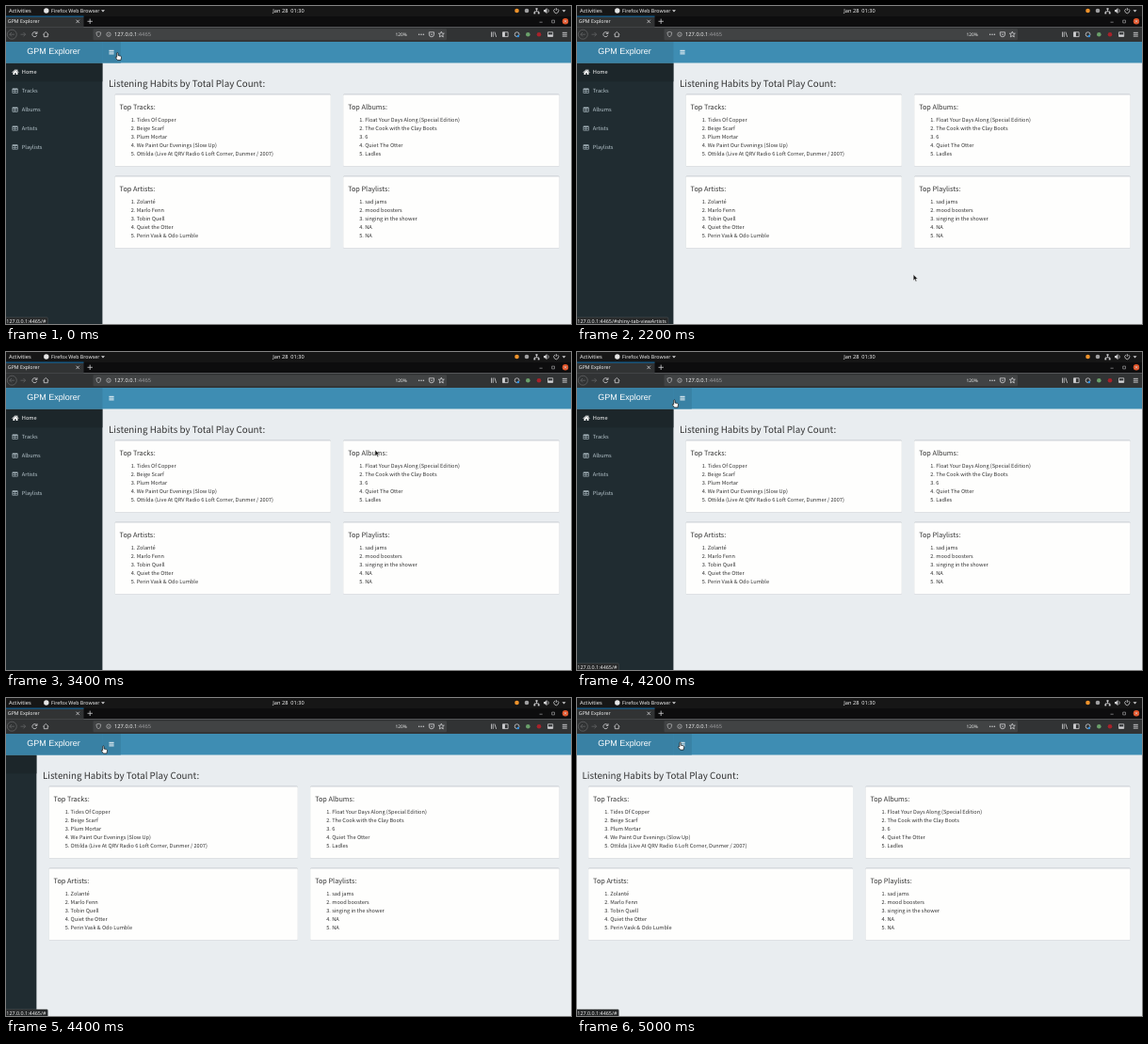
Recreate the animation shown at these times as an HTML page. Size 600 px wide and 338 px high, loop 5.3 s.

```html
<!DOCTYPE html>
<html lang="en">
<head>
<meta charset="utf-8">
<title>GPM Explorer</title>
<style>
  html, body { margin: 0; width: 100%; height: 100%; overflow: hidden; background: #e9edf0; }
  svg { display: block; width: 100%; height: 100%; }
  text { text-rendering: geometricPrecision; white-space: pre; }
  .ui { font-family: "Noto Sans", "Open Sans", sans-serif; fill: #f2f2f2; }
  .page { font-family: "Noto Sans CJK JP", "Noto Sans CJK SC", "Noto Sans CJK", "Noto Sans", sans-serif; fill: #333; }
  .logo { font-family: "Liberation Sans", Arial, sans-serif; fill: #fff; }
  .line { fill: none; stroke: #d0d0d2; stroke-width: .8; }
  .dim { opacity: .3; }
</style>
</head>
<body>
<svg id="stage" viewBox="0 0 600 338" preserveAspectRatio="none"></svg>
<script>
const LOOP = 5300, SIDEBAR = 103.5, EDGE = 102.4;
const stage = document.getElementById('stage');

const rect = (x, y, w, h, fill, more = '') =>
  `<rect x="${x}" y="${y}" width="${w}" height="${h}" fill="${fill}" ${more}/>`;
const dot = (x, y, r, fill) => `<circle cx="${x}" cy="${y}" r="${r}" fill="${fill}"/>`;
const line = (d, more = '') => `<path class="line" d="${d}" ${more}/>`;
const shape = (d, fill = '#d0d0d2') => `<path d="${d}" fill="${fill}"/>`;
const text = (cls, x, y, size, str, more = '') =>
  `<text class="${cls}" x="${x}" y="${y}" font-size="${size}" ${more}>${str}</text>`;
const bars = (x, y, w, gap, color) =>
  [-1, 0, 1].map(i => rect(x, y + i * gap - .45, w, .9, color)).join('');

// Desktop bar and browser window
function desktopBar() {
  return rect(0, 0, 600, 11, '#161616') +
    text('ui', 3, 7, 5.7, 'Activities') +
    dot(42.8, 5, 2.7, '#e6e6e6') +
    text('ui', 48, 7, 5.32, 'Firefox Web Browser') +
    shape('M101 4.2h4l-2 2.4z') +
    text('ui', 300, 7, 5.64, 'Jan 28  01:30', 'text-anchor="middle"') +
    dot(542.5, 5, 2.3, '#f0932b') +
    dot(553, 5, 2.3, '#a0a0a2') +
    line('M563.5 4v1.8M561.3 7V5.8h4.4V7') +
    rect(562.5, 2.2, 2, 1.8, '#d0d0d2') + rect(560.4, 6.6, 1.8, 1.8, '#d0d0d2') + rect(564.8, 6.6, 1.8, 1.8, '#d0d0d2') +
    shape('M571 4h1.4l2-2v6.2l-2-2H571z') + line('M575.6 3.4q1.4 1.7 0 3.4') +
    line('M583 3a2.5 2.5 0 1 0 2.6 0M584.3 2v3') +
    shape('M590.5 4.2h4l-2 2.4z');
}

function tabStrip() {
  return rect(0, 11, 600, 11.5, '#0d0d0e') +
    rect(0, 11, 82.5, 11.5, '#313334') + rect(0, 10.6, 82.5, .9, '#0a74b8') +
    text('ui', 1.8, 18.2, 5.27, 'GPM Explorer') +
    line('M74.5 14.7l3.4 3.4m0-3.4l-3.4 3.4') +
    line('M86.5 16.3h5.4m-2.7-2.7v5.4') +
    '<g opacity=".65">' + line('M566.5 17.2h3.2') + line('M579.7 15.1h2.8v2.8h-2.8z') + '</g>' +
    dot(594, 16.3, 3.2, '#e2552a') + line('M592.8 15.1l2.4 2.4m0-2.4l-2.4 2.4', 'stroke-width=".7"');
}

function toolbar() {
  const address = rect(92.5, 24.2, 375.5, 12, '#414344', 'rx="1.2"') +
    line('M98.3 27.4l2.4 .8q0 3.6-2.4 4.8q-2.4-1.2-2.4-4.8z', 'opacity=".75"') +
    line('M111.2 30.2a2.2 2.2 0 1 1-4.4 0a2.2 2.2 0 1 1 4.4 0M109 29.8v1.6', 'opacity=".75"') +
    text('ui', 115, 32.2, 5.74, '127.0.0.1<tspan fill="#9a9a9c">:4465</tspan>') +
    text('ui', 413.5, 31.9, 4.8, '120%') +
    [438.6, 441, 443.4].map(x => dot(x, 30.2, .75, '#d0d0d2')).join('') +
    line('M449.3 27.8h5.2v2.2q0 2.8-2.6 2.8t-2.6-2.8zM450.7 29.5l1.2 1.2l1.2-1.2') +
    line('M462.3 27.2l.9 2h2.1l-1.6 1.5l.6 2.2l-2-1.2l-2 1.2l.6-2.2l-1.6-1.5h2.1z', 'stroke-width=".7"');
  return rect(0, 22.5, 600, 15.5, '#313334') +
    `<g class="dim"><circle class="line" cx="6.3" cy="30.2" r="5"/>` +
    line('M9 30.2H3.8m2.2-2.2l-2.2 2.2l2.2 2.2') +
    line('M15.5 30.2h5.2m-2.2-2.2l2.2 2.2l-2.2 2.2') + '</g>' +
    line('M32.7 29.2a2.5 2.5 0 1 0 0 2M33 27.2v2.2h-2.2') +
    line('M39.3 30.3l3-2.8l3 2.8M40.3 29.8v2.9h4v-2.9') + address +
    line('M515.5 27.5v5.4m1.7-5.4v5.4m1.7-5.4l1.7 5.4') +
    line('M527.5 27.8h5.6v4.8h-5.6z') + rect(527.5, 27.8, 2.4, 4.8, '#d0d0d2') +
    line('M545 30.2a2.4 2.4 0 1 1-4.8 0a2.4 2.4 0 1 1 4.8 0') + dot(543.8, 32, 1.3, '#2f8fe0') +
    dot(554.3, 30.2, 2.3, '#6aa06a') +
    dot(566, 30.2, 2.3, '#a8222a') +
    line('M575.5 27.8h5.2v4.6h-5.2z') + rect(575.5, 30.4, 5.2, 2, '#d0d0d2') +
    bars(590.8, 30.2, 5, 1.9, '#d0d0d2');
}

// Dashboard
const tableIcon = y =>
  rect(6.6, y - 2.7, 6, 5.2, '#a9b8bf', 'rx=".6"') +
  [[7.3, -1.2], [9.9, -1.2], [7.3, .6], [9.9, .6]].map(([x, dy]) => rect(x, y + dy, 2, 1.2, '#202c31')).join('');
const homeIcon =
  shape('M6.3 70.4l3.7-3.2l1.4 1.2v-.8h.9v1.6l1.3 1.2l-.5 .5l-3.1-2.7l-3.2 2.7z', '#fff') +
  shape('M7.5 70.8l2.5-2.2l2.4 2.2v2.2h-1.7v-1.7h-1.5v1.7h-1.7z', '#fff');

const MENU = ['Home', 'Tracks', 'Albums', 'Artists', 'Playlists'];
const rowY = i => 70.4 + i * 19.9;

function sidebar() {
  return '<g id="sidebar">' + rect(EDGE - SIDEBAR, 60.5, SIDEBAR, 278, '#202c31') +
    rect(EDGE - SIDEBAR, 60.5, SIDEBAR, 19.8, '#1c262a') +
    MENU.map((name, i) => (i ? tableIcon(rowY(i)) : homeIcon) +
      text('page item', 16.8, rowY(i) + 2, 5.64, name)).join('') + '</g>';
}

const CARDS = [
  ['Top Tracks:', ['Tides Of Copper', 'Beige Scarf', 'Plum Mortar', 'We Paint Our Evenings (Slow Up)',
    'Ottilda (Live At QRV Radio 6 Loft Corner, Dunmer / 2007)']],
  ['Top Albums:', ['Float Your Days Along (Special Edition)', 'The Cook with the Clay Boots', '6', 'Quiet The Otter', 'Ladles']],
  ['Top Artists:', ['Zolanté', 'Marlo Fenn', 'Tobin Quell', 'Quiet the Otter', 'Perin Vask &amp; Odo Lumble']],
  ['Top Playlists:', ['sad jams', 'mood boosters', 'singing in the shower', 'NA', 'NA']]
];

function card([title, items], i) {
  const y = i < 2 ? 93.2 : 180.2;
  return '<g class="card">' +
    rect(0, y + .6, 0, 77.2, '#d3d7da', 'rx="1.3"') +
    rect(0, y, 0, 77, '#d2d6da', 'rx="1.3"') +
    rect(0, y + 1.3, 0, 75.7, '#fefefd', 'rx="1"') +
    text('page', 4.9, y + 17, 7.27, title) +
    items.map((item, n) => text('page', 17, y + 29.7 + n * 9, 5.64, `${n + 1}. ${item}`)).join('') + '</g>';
}

function header() {
  return rect(0, 38, 600, 22.5, '#3e8db3') + rect(0, 38, EDGE, 22.5, '#3981a4') +
    rect(EDGE, 38, 19.4, 22.5, '#3981a4', 'id="toggle"') +
    text('logo', 50.5, 51.4, 9, 'GPM Explorer', 'text-anchor="middle"') +
    bars(109.4, 49.1, 5.2, 1.8, '#fff');
}

stage.innerHTML = rect(0, 0, 600, 338, '#e9edf0') +
  text('page', 109, 85.7, 9.8, 'Listening Habits by Total Play Count:', 'id="heading"') +
  CARDS.map(card).join('') + sidebar() + header() + desktopBar() + tabStrip() + toolbar() +
  '<g id="status">' + rect(-1, 331, 0, 8, '#252728', 'rx="1" stroke="#55595b" stroke-width=".5"') +
  text('ui', .3, 336.7, 5.4, '') + '</g>' +
  '<path id="arrow" d="M0 0v6.3l1.5-1.4l1 2.3l1.1-.5l-1-2.2h2z" fill="#111" stroke="#eee" stroke-width=".5"/>' +
  '<path id="hand" d="M-1.7-3.7q.7-.7 1.3 0v2.7l2.7 .6q.9 .3 .8 1.300l-.5 3h-3.600l-2-2.700q-.2-1 .7-.8l.6 .5z" fill="#fff" stroke="#111" stroke-width=".7"/>';

const el = id => document.getElementById(id);
const cards = [...document.querySelectorAll('.card')];
const menuItems = [...document.querySelectorAll('.item')];

// Pointer keys: time, x, y
const PATH = [
  [0, 119.4, 53.6], [1600, 119.4, 53.6], [1700, 112, 66], [1800, 98, 92], [1900, 90, 122], [2000, 97, 136],
  [2100, 215, 222], [2200, 357.2, 285.5], [2500, 425, 262], [2800, 440, 215], [3000, 432, 165],
  [3200, 405, 118], [3400, 392, 104.2], [3600, 285, 122], [3800, 190, 125], [4000, 133, 84],
  [4100, 112, 63], [4200, 104.4, 55], [4700, 104.4, 55], [5000, 110.6, 51.2], [LOOP, 110.6, 51.2]
];

function pointerAt(t) {
  const k = PATH.findIndex(([time]) => time > t);
  const [t0, x0, y0] = PATH[k - 1], [t1, x1, y1] = PATH[k];
  const f = (t - t0) / (t1 - t0);
  return { x: x0 + (x1 - x0) * f, y: y0 + (y1 - y0) * f };
}

function statusAt(t) {
  if (t < 1800 || t >= 4200) return '#';
  if (t < 1900) return '#shiny-tab-viewTracks';
  return t < 2300 ? '#shiny-tab-viewArtists' : '';
}

const move = (node, x, y = 0) => node.setAttribute('transform', `translate(${x} ${y})`);
const show = (node, on) => node.setAttribute('visibility', on ? 'visible' : 'hidden');

function draw(t) {
  const p = Math.min(1, Math.max(0, (t - 4214) / 300));
  const shift = SIDEBAR * p * p * (3 - 2 * p);
  move(el('sidebar'), -shift);
  move(el('heading'), -shift);

  const left = 115.7 - shift, middle = 351.5 - shift / 2;
  cards.forEach((node, i) => {
    const x = i % 2 ? middle + 6.75 : left;
    const width = (i % 2 ? 587.5 : middle - 6.75) - x;
    move(node, x);
    node.querySelectorAll('rect').forEach(r => r.setAttribute('width', width));
  });

  const { x, y } = pointerAt(t);
  const onToggle = t < 1700 || t >= 4200;
  const onMenu = !onToggle && x < EDGE && y > 60;
  const row = onMenu ? Math.floor((y - 60.5) / 19.9) : 0;
  menuItems.forEach((node, i) => node.style.fill = i === 0 || i === row ? '#fff' : '#b8c7ce');
  show(el('toggle'), onToggle);
  show(el('hand'), onToggle || onMenu);
  show(el('arrow'), !onToggle && !onMenu);
  move(el('hand'), x, y);
  move(el('arrow'), x, y);

  const status = statusAt(t), [box, label] = el('status').children;
  show(el('status'), status);
  label.textContent = '127.0.0.1:4465/' + status;
  box.setAttribute('width', label.getComputedTextLength() + 3.2);
}

function tick(now) {
  draw(Math.floor(now % LOOP / 100) * 100);
  requestAnimationFrame(tick);
}
tick(performance.now());
</script>
</body>
</html>
```
